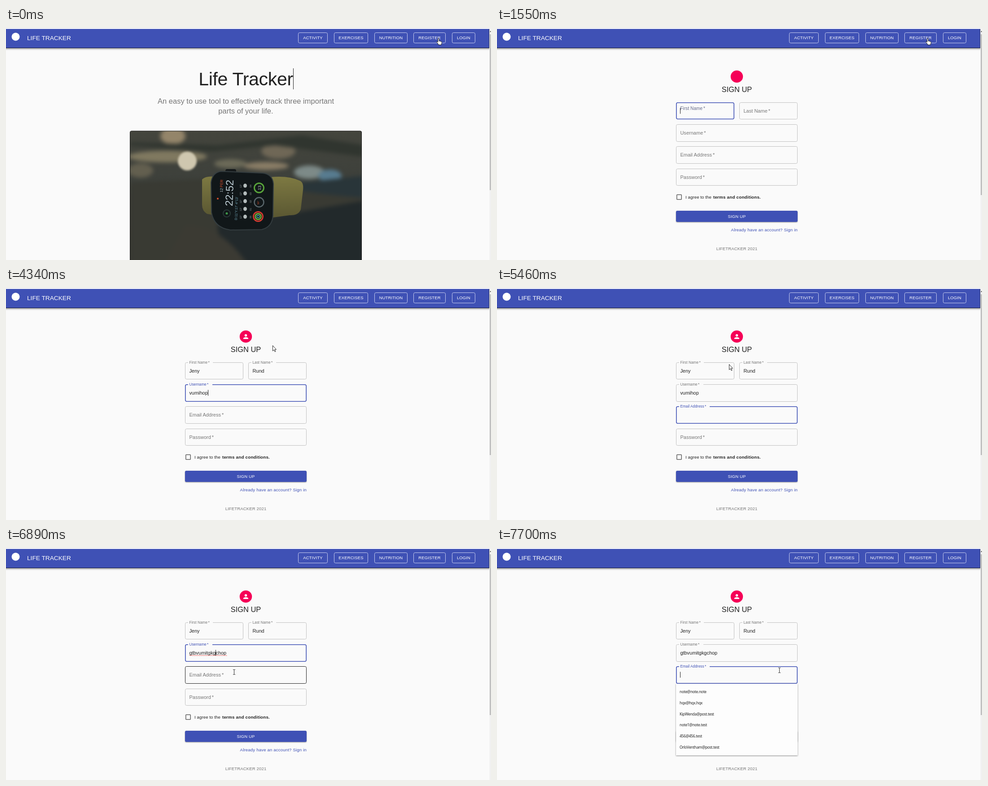
An HTML page that plays this animation: 1081x518 px, repeating every 8000 ms.

```html
<!DOCTYPE html>
<html lang="en">
<head>
<meta charset="utf-8">
<title>Life Tracker</title>
<style>
  html, body { margin: 0; width: 100%; height: 100%; overflow: hidden; background: #fafafa; }
  svg { display: block; width: 1081px; height: 518px; }
  text { font-family: "Liberation Sans", Arial, sans-serif; white-space: pre; fill: #212121; }
  .btn { font-size: 9.5px; letter-spacing: .1px; text-anchor: middle; fill: #fff; }
  .body { font-size: 9.6px; letter-spacing: .1px; }
  .mid { text-anchor: middle; }
  .grey { fill: #757575; }
  .value { font-size: 10.96px; }
  .mail { font: 8.5px "Noto Sans", "Open Sans", sans-serif; letter-spacing: -.35px; }
  .wide { filter: blur(5px); }
  .soft { filter: blur(2px); }
</style>
</head>
<body>
<svg viewBox="0 0 1081 518">
  <defs>
    <linearGradient id="fade" x2="0" y2="1">
      <stop stop-opacity=".3"/><stop offset="1" stop-opacity="0"/>
    </linearGradient>
    <linearGradient id="room" x2="0" y2="1">
      <stop stop-color="#44453d"/><stop offset=".38" stop-color="#3d403b"/>
      <stop offset=".5" stop-color="#393a34"/><stop offset="1" stop-color="#33342f"/>
    </linearGradient>
    <linearGradient id="strap" x2="0" y2="1">
      <stop stop-color="#7d7942"/><stop offset="1" stop-color="#5a5732"/>
    </linearGradient>
    <clipPath id="frame"><rect x="277" y="230" width="515.5" height="300" rx="3"/></clipPath>
  </defs>

  <rect width="1081" height="2" fill="#fff"/>
  <rect y="45" width="1077" height="5" fill="url(#fade)"/>
  <rect y="2" width="1077.5" height="43" fill="#11163a"/>
  <rect y="2" width="1076.5" height="42" fill="#3f51b5"/>
  <circle cx="21.5" cy="19.5" r="9" fill="#fff"/>
  <text x="47" y="26.5" font-size="13.7" style="fill:#fff">LIFE TRACKER</text>
  <g id="nav"></g>
  <rect x="1077.5" width="3.5" height="518" fill="#f1f1f1"/>
  <path d="M1078 9l3-3v3z" fill="#555"/>
  <rect id="thumb" x="1078" y="14" width="3" fill="#c1c1c1"/>

  <g id="home">
    <text class="mid" x="534.5" y="128" font-size="41.1" letter-spacing="-.34">Life Tracker</text>
    <rect id="headCaret" x="640" y="90" width="1" height="47" fill="#212121"/>
    <g class="mid" font-size="16.44" letter-spacing=".04">
      <text class="grey" x="534.5" y="169">An easy to use tool to effectively track three important</text>
      <text class="grey" x="534.5" y="191">parts of your life.</text>
    </g>
    <g clip-path="url(#frame)">
      <rect x="276" y="229" width="518" height="300" fill="url(#room)"/>
      <g class="wide">
        <ellipse cx="372" cy="241" rx="28" ry="19" fill="#94856a"/>
        <ellipse cx="360" cy="287" rx="88" ry="13" fill="#807960"/>
        <ellipse cx="300" cy="318" rx="28" ry="16" fill="#635f4f"/>
        <ellipse cx="500" cy="303" rx="36" ry="10" fill="#6c6a58"/>
        <ellipse cx="607" cy="275" rx="38" ry="17" fill="#6f6756"/>
        <ellipse cx="580" cy="308" rx="50" ry="9" fill="#8a7d66"/>
        <ellipse cx="676" cy="322" rx="34" ry="15" fill="#7d8a88"/>
        <ellipse cx="722" cy="330" rx="26" ry="14" fill="#587c90"/>
        <path d="M276 255L470 262 660 240 800 262V288L600 262 460 276 276 262z" fill="#30352f"/>
        <path d="M660 345L800 330V400L650 380z" fill="#293539"/>
        <path d="M276 345L470 336 700 370 800 380V530H276z" fill="#393a33"/>
        <path d="M470 440L600 420 800 385V530H490z" fill="#22292b"/>
        <path d="M400 440Q480 440 540 530H350z" fill="#3b3a33"/>
      </g>
      <circle class="soft" cx="404" cy="297" r="21" fill="#cfc7af"/>
      <path d="M437 338Q446 330 465 332V418L448 415Q437 408 437 395z" fill="url(#strap)"/>
      <path d="M588 333Q630 329 655 341Q664 345 662 362L657 405Q652 419 632 418L588 424z" fill="url(#strap)"/>
      <rect x="489" y="315" width="24" height="11" rx="4" fill="#15191a"/>
      <path d="M480 320L572 324Q594 326 596 348L595 418Q594 444 570 450L500 451Q464 446 458 412L457 345Q460 322 480 320z" fill="#111719" stroke="#343d40" stroke-width="2"/>
      <g id="dial"></g>
    </g>
    <rect x="276.5" y="230" width="516" height="300" rx="3" fill="none" stroke="#111"/>
  </g>

  <g id="form">
    <circle cx="534.5" cy="108.4" r="13.7" fill="#f50057"/>
    <path id="person" transform="translate(526.3 100.2) scale(.685)" fill="#fff" d="M12 12a4 4 0 1 0 0-8 4 4 0 0 0 0 8zm0 2c-2.67 0-8 1.34-8 4v2h16v-2c0-2.66-5.33-4-8-4z"/>
    <text class="mid" x="534.5" y="143" font-size="16.44">SIGN UP</text>
    <g id="fields"></g>
    <path id="squiggle" fill="none" stroke="#e53935" stroke-width=".8"/>
    <rect id="caret" width="1" height="13" fill="#212121"/>
    <rect x="400.8" y="372.3" width="10.4" height="10.4" rx=".8" fill="none" stroke="#5f5f5f" stroke-width="1.5"/>
    <text class="body" x="420" y="381">I agree to the</text>
    <text x="482" y="381" font-size="9.8" font-weight="bold" letter-spacing=".2">terms and conditions.</text>
    <rect x="399" y="408" width="271" height="25" rx="3" fill="#3f51b5" style="filter:drop-shadow(0 1px 1px #0006)"/>
    <text class="btn" x="534.5" y="424">SIGN UP</text>
    <text x="670" y="454" font-size="9.6" letter-spacing=".17" text-anchor="end" style="fill:#3f51b5">Already have an account? Sign in</text>
    <text class="body mid grey" x="534.5" y="495.5">LIFETRACKER 2021</text>
    <g id="list">
      <rect x="399" y="303" width="271" height="160" fill="#fdfdfd" style="filter:drop-shadow(0 1px 1.5px #0007)"/>
    </g>
  </g>

  <g id="pointer" stroke="#111" stroke-width=".9" fill="#fff">
    <path id="hand" d="M-1.2 1a1.2 1.2 0 0 1 2.4 0V6l1.9.3 1.8.5 1.4.6q1 .6 1 1.7V11l-1 2v1.6H-.4V13L-3.4 9.5Q-4.4 8-3.6 7.5T-1.9 8L-1.2 8.8z"/>
    <path id="arrow" d="M.5.5V12.6L3.2 10 5.3 14.4 7 13.6 5 9.3H8.4z"/>
    <path id="beam" fill="none" d="M-2.5-5.5H-.6L0-5 .6-5.5H2.5M0-5V5M-2.5 5.5H-.6L0 5 .6 5.5H2.5"/>
  </g>
</svg>
<script>
const NS = 'http://www.w3.org/2000/svg', LOOP = 8000, SWITCH = 1540;
const $ = id => document.getElementById(id);
const add = (parent, tag, attrs, text) => {
  const el = document.createElementNS(NS, tag);
  set(el, attrs);
  if (text) el.textContent = text;
  return parent.appendChild(el);
};
function set(el, attrs) { for (const k in attrs) el.setAttribute(k, attrs[k]); }
const show = (id, on) => { $(id).style.display = on ? '' : 'none'; };
const clamp = (v, lo, hi) => Math.min(hi, Math.max(lo, v));
const mix = (a, b, p) => a + (b - a) * p;

// Navigation buttons
[['ACTIVITY', 651, 717], ['EXERCISES', 731, 807], ['NUTRITION', 821, 895],
 ['REGISTER', 908, 980], ['LOGIN', 994, 1046]].forEach(([name, x, r]) => {
  add($('nav'), 'rect', { x: x + .5, y: 10.5, width: r - x - 1, height: 23, rx: 3, fill: 'none', stroke: '#c9cef0' });
  add($('nav'), 'text', { class: 'btn', x: (x + r) / 2, y: 25.3 }, name);
});

// Watch face, its text running upwards
const upright = (x, y, size, color, text) =>
  add($('dial'), 'text', { transform: `translate(${x} ${y}) rotate(-88)`, 'font-size': size, style: `fill:${color}` }, text);
const ring = (x, y, r, color, w) =>
  add($('dial'), 'circle', { cx: x, cy: y, r, fill: 'none', stroke: color, 'stroke-width': w });
upright(505, 398, 23.5, '#b9c8cf', '22:52');
upright(483, 367, 8.5, '#b9c8cf', '12');
upright(483, 356, 8.5, '#d8502e', 'PER');
upright(515, 429, 7.5, '#6fa3b5', "D:11'Y:17' 4°13'");
for (let i = 0; i < 5; i++) {
  const y = 352 + i * 17.3;
  upright(525, y + 5, 5.5, '#8f9a9c', '12°');
  upright(547, y + 4, 5.5, '#8f9a9c', '0' + (4 - i));
  add($('dial'), 'ellipse', { cx: 533, cy: y, rx: 4, ry: 4.5, fill: '#b4bcbc' });
}
ring(564, 357, 10.5, '#58a33a', 3);
upright(568, 362, 9, '#c5cccc', '13');
ring(564, 389, 10.5, '#59666b', 2.5);
upright(564, 394, 5.5, '#d8502e', '50°');
ring(562, 421, 10.5, '#cf3a30', 3);
ring(562, 421, 6.5, '#79b83c', 2.5);
ring(562, 421, 3, '#3c8f94', 2);
ring(492, 414, 8, '#2b3a3a', 2);
add($('dial'), 'circle', { cx: 492, cy: 414, r: 2.5, fill: '#3f9a4a' });
add($('dial'), 'circle', { cx: 472, cy: 381, r: 2, fill: '#d8502e' });

// Suggestions
['note@note.note', 'hqx@hqx.hqx', 'KipWenda@post.test', 'note1@note.test', '456@456.test', 'OrloVentham@post.test']
  .forEach((mail, i) => add($('list'), 'text', { class: 'mail', x: 407, y: 324.2 + i * 24.67 }, mail));

// Form fields: name, left, top, right, bottom, end of the label gap
const fields = [
  ['First Name', 399, 166, 529, 204, 461], ['Last Name', 540, 166, 670, 204, 602],
  ['Username', 399, 215, 670, 254, 460], ['Email Address', 399, 264, 670, 303, 474],
  ['Password', 399, 314, 670, 352, 460]
].map(([name, x, y, r, b, gap]) => {
  const g = $('fields');
  const box = add(g, 'path', { fill: 'none' });
  const label = add(g, 'text', { x: x + 9.4, 'letter-spacing': .05 }, name);
  add(label, 'tspan', { dx: '.17em' }, '*');
  return { x, y, r, b, gap, box, label, value: add(g, 'text', { class: 'value', x: x + 9.4, y: y + 23 }) };
});

function outline(f, open, w) {
  const i = w / 2, l = f.x + i, t = f.y + i, r = f.r - i, b = f.b - i, c = 3;
  const from = open ? f.gap : l + c;
  return `M${from} ${t}H${r - c}a${c} ${c} 0 0 1 ${c} ${c}V${b - c}a${c} ${c} 0 0 1 ${-c} ${c}` +
    `H${l + c}a${c} ${c} 0 0 1 ${-c} ${-c}V${t + c}a${c} ${c} 0 0 1 ${c} ${-c}` + (open ? `H${f.x + 7}` : 'z');
}

// Decelerating curve, cubic-bezier(0, 0, .2, 1)
function easeOut(u) {
  let lo = 0, hi = 1;
  for (let i = 0; i < 20; i++) {
    const s = (lo + hi) / 2;
    if (.6 * s * s + .4 * s ** 3 < u) lo = s; else hi = s;
  }
  return lo * lo * (3 - 2 * lo);
}
const rise = (t, start) => easeOut(clamp((t - start) / 200, 0, 1));

// Clicks, tabs and key presses
const PREFIX = 6000, INFIX = 6380, REFOCUS = 5730, LEAVE = 6940;
const focusAt = [[1530, 0], [3010, 1], [4110, 2], [4620, 3], [REFOCUS, 2], [LEAVE, 3]];
const keys = [[2430, 2700, 2760, 2820], [3270, 3420, 3600, 3930], [4230, 4230, 4280, 4280, 4280, 4340, 4340]];
const burst = (t, start, max) => clamp(Math.floor((t - start) / 55) + 1, 0, max);
const presses = (start, n) => Array.from({ length: n }, (_, i) => start + i * 55);
const caretResets = [...focusAt.map(f => f[0]), ...keys.flat(), ...presses(PREFIX, 3), ...presses(INFIX, 5), 7560];
const typed = (text, times, t) => text.slice(0, times.filter(k => t >= k).length);

// Pointer moves: start, end, x, y, steps
const moves = [
  [520, 850, 960, 23, 6], [1680, 2050, 594, 128, 9], [5460, 5650, 418, 224, 4], [6130, 6330, 446, 234, 4],
  [6600, 6850, 508.5, 277, 5], [7120, 7320, 565, 246, 4], [7370, 7550, 629.5, 273, 4]
];
function pointerAt(t) {
  let x = 964, y = 23;
  for (const [a, b, tx, ty, n] of moves) {
    if (t < a) break;
    const p = clamp(Math.floor((t - a) / (b - a) * (n - 1)) + 1, 1, n) / n;
    const e = p * (2 - p);
    x = mix(x, tx, e);
    y = mix(y, ty, e);
  }
  return [x, y];
}

const pen = document.createElement('canvas').getContext('2d');
pen.font = '10.96px "Liberation Sans", Arial, sans-serif';
const widthOf = s => pen.measureText(s).width;

function drawForm(t, mx, my) {
  const focus = (focusAt.filter(f => t >= f[0]).pop() || [0, -1])[1];
  const a = burst(t, PREFIX, 3), b = burst(t, INFIX, 5);
  const user = t < PREFIX ? typed('vumihop', keys[2], t)
    : 'gtb'.slice(0, a) + 'vumi' + 'tgkgc'.slice(0, b) + 'hop';
  const values = [typed('Jeny', keys[0], t), typed('Rund', keys[1], t), user, '', ''];
  const lifts = [rise(t, 1530), rise(t, 3010), rise(t, 4110),
    t < REFOCUS ? rise(t, 4620) : t < LEAVE ? 1 - rise(t, REFOCUS) : rise(t, LEAVE), 0];

  fields.forEach((f, i) => {
    const on = i === focus, p = lifts[i];
    const hover = t > 5520 && mx > f.x && mx < f.r && my > f.y && my < f.b;
    const w = on ? 1.6 : 1;
    set(f.box, { d: outline(f, p > .5, w), 'stroke-width': w, stroke: on ? '#3f51b5' : hover ? '#212121' : '#c0c0c0' });
    set(f.label, { y: mix(f.y + 23, f.y + 3.3, p), 'font-size': mix(10.96, 8.22, p) });
    const tint = on ? p : 0;
    f.label.style.fill = `rgb(${mix(117, 63, tint)},${mix(117, 81, tint)},${mix(117, 181, tint)})`;
    f.value.textContent = values[i];
  });

  const last = Math.max(...caretResets.filter(k => k <= t));
  const lit = focus >= 0 && (t - last) % 980 < 490;
  show('caret', lit);
  if (lit) {
    const f = fields[focus], text = values[focus];
    let at = text.length;
    if (focus === 2 && t >= REFOCUS) at = b ? 7 + Math.min(b, 4) : a;
    set($('caret'), { x: Math.round(f.x + 9.4 + widthOf(text.slice(0, at))), y: f.y + 12.5 });
  }

  const misspelt = focus === 2 && a > 0;
  show('squiggle', misspelt);
  if (misspelt) {
    const waves = Math.round(widthOf(user) / 4);
    set($('squiggle'), { d: 'M408.5 240' + 'q1-2 2 0t2 0'.repeat(waves) });
  }
  show('person', t >= 1580);
  show('list', (t >= 7040 && t < 7170) || t >= 7650);
}

function draw() {
  const t = performance.now() % LOOP, home = t < SWITCH;
  const [x, y] = pointerAt(t);
  show('home', home);
  show('form', !home);
  set($('thumb'), { height: home ? 348 : 359 });
  show('headCaret', t < 130 || (t >= 650 && t < 1180));
  if (!home) drawForm(t, x, y);

  const kind = x > 908 && y < 35 ? 'hand' : t >= 5520 && y > 172 ? 'beam' : 'arrow';
  ['hand', 'arrow', 'beam'].forEach(k => show(k, k === kind));
  set($('pointer'), { transform: `translate(${x} ${y})` });
  requestAnimationFrame(draw);
}
draw();
</script>
</body>
</html>
```
